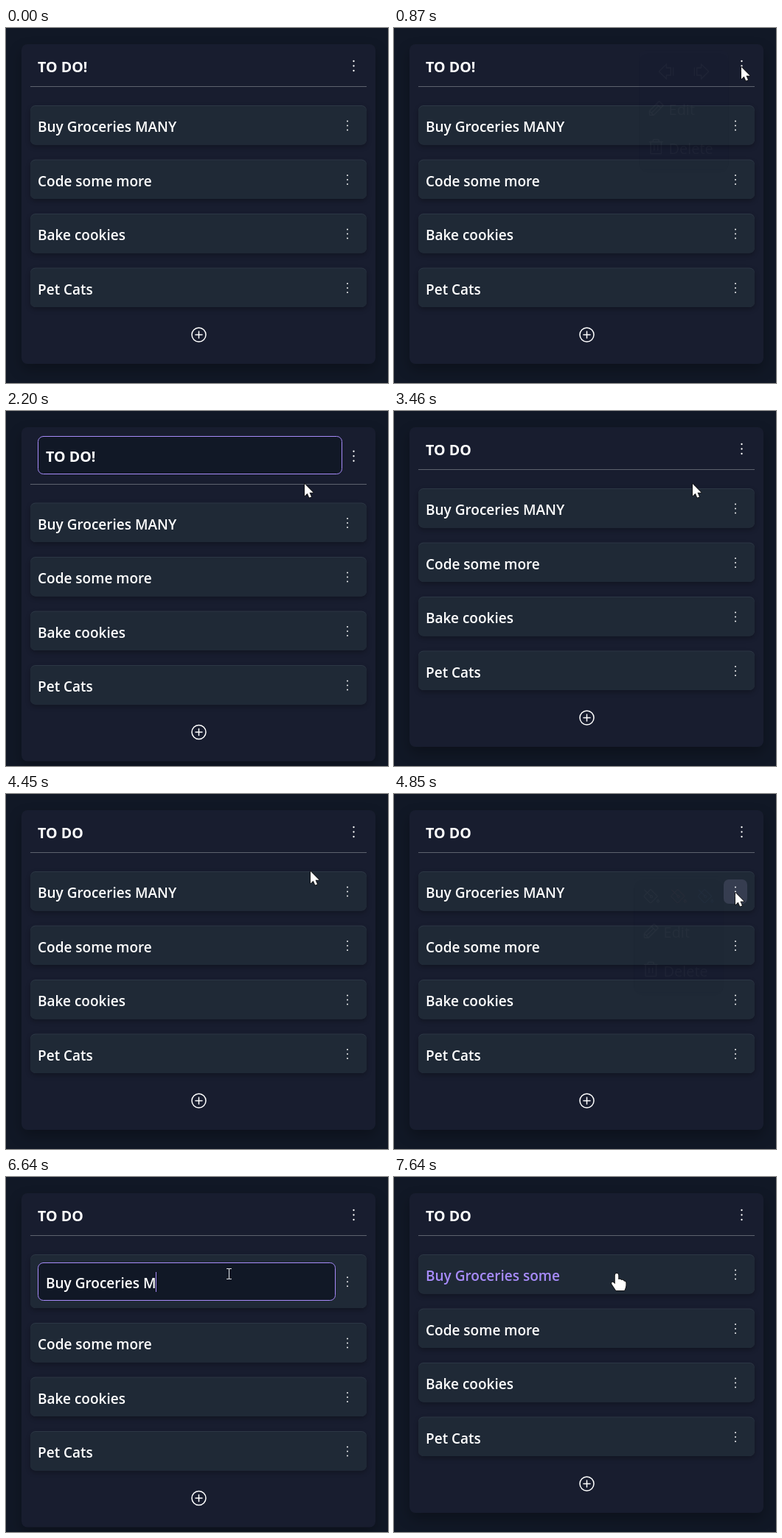
Animation, 518 px wide and 482 px high, one loop 8000 ms. Source, as an HTML page with a canvas:

```html
<!DOCTYPE html>
<html lang="en">
<head>
<meta charset="utf-8">
<title>To-do board</title>
<style>
html, body { margin: 0; width: 100%; height: 100%; overflow: hidden; background: #111826; }
canvas { display: block; }
</style>
</head>
<body>
<canvas id="stage" width="518" height="482"></canvas>
<script>
const ctx = document.getElementById('stage').getContext('2d');
const LOOP = 8000, TICK = 66.45, GROW = 19.5;
const WHITE = '#fff', PURPLE = '#a78bfa';
const FAMILY = '"Open Sans", "Noto Sans", sans-serif';
const TITLE = `700 19.6px ${FAMILY}`, ITEM = `600 19px ${FAMILY}`, MENU = `400 19px ${FAMILY}`;

const EDIT_TITLE = [25, 52], EDIT_ITEM = [87, 114];
const TITLE_MENU = [13, 25], ITEM_MENU = [73, 87];
const CLICKS = [12, 24, 72, 86];
const titleText = [[0, 'TO DO!'], [41, 'TO DO']];
const itemText = [[0, 'MANY'], [95, 'MAN'], [98, 'MA'], [100, 'M'], [103, ''],
  [106, 's'], [108, 'so'], [111, 'som'], [113, 'some']];
const path = [[7, 508, 72], [9, 486, 60], [11, 471, 53], [15, 471, 53], [19, 427, 68], [20, 419, 78],
  [22, 405, 99], [66, 405, 99], [68, 420, 110], [71, 459, 131], [72, 463, 134], [75, 463, 134],
  [80, 399, 166], [82, 387, 179], [83, 385, 181], [86, 383, 179], [87, 366, 166], [88, 322, 140],
  [89, 302, 131], [121, 302, 131]];

const icons = {
  pencil: 'M96 216H48a8 8 0 0 1-8-8V163a8 8 0 0 1 2-5L166 34a8 8 0 0 1 11 0L222 79a8 8 0 0 1 0 11L98 214ZM136 64l56 56M164 92L68 188M95 215L41 161',
  trash: 'M216 56H40M104 104v64M152 104v64M200 56V208a8 8 0 0 1-8 8H64a8 8 0 0 1-8-8V56M168 56V40a16 16 0 0 0-16-16H104a16 16 0 0 0-16 16V56',
  arrow: 'M32 128L128 32V80H184V176H128V224ZM216 80V176',
  bucket: 'M124 24L232 130L136 227a16 16 0 0 1-23 0L28 142a16 16 0 0 1 0-22ZM32 32L122 122M154 136a18 18 0 1 1-36 0a18 18 0 1 1 36 0M240 182q16 18 16 28a16 16 0 0 1-32 0q0-10 16-28Z'
};
for (const name in icons) icons[name] = new Path2D(icons[name]);
const ARROW = new Path2D('M0 0V16.2L3.7 12.8L6.2 18.6L9 17.4L6.5 11.7H11.6Z');
const HAND = new Path2D('M-2.2 2.2a2.2 2.2 0 0 1 4.4 0V8q3-1 4 1q3-.6 3.6 1.4q2.6-.2 2.6 2V16q0 3-2 7H-1L-6.6 14.6q-1-2.6 1.4-2.8l3 2.4Z');

const within = (tick, [start, end]) => tick >= start && tick < end;
const latest = (steps, tick) => steps.filter(s => s[0] <= tick).pop();

function box(x, y, w, h, r, fill, stroke) {
  ctx.beginPath();
  ctx.roundRect(x, y, w, h, r);
  if (fill) { ctx.fillStyle = fill; ctx.fill(); }
  if (stroke) { ctx.strokeStyle = stroke; ctx.lineWidth = 1; ctx.stroke(); }
}

function shadowBox(x, y, w, h, r, fill, blur, offset) {
  ctx.save();
  ctx.shadowColor = 'rgba(0,0,0,.28)';
  ctx.shadowBlur = blur;
  ctx.shadowOffsetY = offset;
  box(x, y, w, h, r, fill);
  ctx.restore();
}

function text(str, x, baseline, font, color = WHITE) {
  ctx.font = font;
  ctx.fillStyle = color;
  ctx.fillText(str, x, baseline);
}

function icon(name, cx, cy, scale, color, flip = 1) {
  ctx.save();
  ctx.translate(cx, cy);
  ctx.scale(scale * flip, scale);
  ctx.translate(-128, -128);
  ctx.strokeStyle = color;
  ctx.lineWidth = 16;
  ctx.lineCap = ctx.lineJoin = 'round';
  ctx.stroke(icons[name]);
  ctx.restore();
}

function dots(x, y, gap, r) {
  ctx.fillStyle = WHITE;
  for (const d of [-gap, 0, gap]) {
    ctx.beginPath();
    ctx.arc(x, y + d, r, 0, 7);
    ctx.fill();
  }
}

function input(y, right, str, font, caretOn) {
  box(43.5, y + .5, right - 44, 51, 7, '#111826', PURPLE);
  text(str, 54, y + 35, font);
  if (caretOn) {
    ctx.fillStyle = PURPLE;
    ctx.fillRect(Math.round(54 + ctx.measureText(str).width), y + 13, 1, 27);
  }
}

function cursorAt(tick) {
  if (tick < path[0][0]) return null;
  const i = path.findIndex(p => p[0] > tick);
  const [t0, x0, y0] = path[i - 1], [t1, x1, y1] = path[i];
  const k = (tick - t0) / (t1 - t0);
  return { x: x0 + (x1 - x0) * k, y: y0 + (y1 - y0) * k };
}

function drawMenu(x, y, rowTop, age, hover, drawTop) {
  const bottom = rowTop + 100, fade = Math.min(1, .03 + age / 3);
  const cx = x + 58, cy = (y + bottom) / 2, zoom = 1 + .05 * (1 - fade);
  ctx.save();
  ctx.globalAlpha = fade;
  ctx.translate(cx, cy);
  ctx.scale(zoom, zoom);
  ctx.translate(-cx, -cy);
  shadowBox(x, y, 116, bottom - y, 8, '#28303e', 10, 4);
  drawTop();
  [['pencil', 'Edit'], ['trash', 'Delete']].forEach(([name, label], i) => {
    const top = rowTop + 50 * i, over = hover(x + 5, top, 106, 40);
    if (over) box(x + 5, top, 106, 40, 7, '#383f50');
    const color = over ? PURPLE : WHITE;
    icon(name, x + 22, top + 20.5, .096, color);
    text(label, x + 38.5, top + 29, MENU, color);
  });
  ctx.restore();
}

function drawCursor({ x, y }, shape, clicking) {
  if (clicking) {
    ctx.fillStyle = 'rgba(235,225,0,.6)';
    ctx.beginPath();
    ctx.arc(x, y, 15, 0, 7);
    ctx.fill();
  }
  ctx.save();
  ctx.translate(Math.round(x), Math.round(y));
  if (shape === 'beam') {
    ctx.strokeStyle = '#e5e7eb';
    ctx.lineWidth = 1;
    ctx.stroke(new Path2D('M-2.5-6.5H0M1-6.5H3.5M.5-6V7M-2.5 7.5H0M1 7.5H3.5'));
  } else {
    const outline = shape === 'hand' ? HAND : ARROW;
    ctx.lineJoin = 'round';
    ctx.strokeStyle = '#111';
    ctx.lineWidth = 1.6;
    ctx.stroke(outline);
    ctx.fillStyle = WHITE;
    ctx.fill(outline);
  }
  ctx.restore();
}

function draw(tick) {
  const cursor = cursorAt(tick);
  const editTitle = within(tick, EDIT_TITLE), editItem = within(tick, EDIT_ITEM);
  const titleMenu = within(tick, TITLE_MENU), itemMenu = within(tick, ITEM_MENU);
  const over = (x, y, w, h) => cursor && cursor.x >= x && cursor.x < x + w && cursor.y >= y && cursor.y < y + h;
  const drop = editTitle ? GROW : 0, stretch = editItem ? GROW : 0;
  let shape = 'arrow';
  const hover = (...area) => {
    const hit = over(...area);
    if (hit) shape = 'hand';
    return hit;
  };

  ctx.fillStyle = '#111826';
  ctx.fillRect(0, 0, 518, 482);
  shadowBox(21, 22, 480, 434 + drop + stretch, 8, '#181d2f', 18, 8);

  const title = latest(titleText, tick)[1];
  const menuOpen = titleMenu || itemMenu;
  if (!menuOpen && !editTitle && over(456, 35, 32, 33)) box(456, 35, 32, 33, 7, '#343b4d');
  if (editTitle) input(34, 456, title, TITLE, within(tick, [25, 33]) || within(tick, [41, 49]));
  else text(title, 43, 60, TITLE);
  dots(471.5, 51.5 + drop / 2, 6.5, 1.15);
  ctx.fillStyle = '#5d626e';
  ctx.fillRect(33, Math.round(79 + drop), 456, 1);

  const groceries = 'Buy Groceries ' + latest(itemText, tick)[1];
  [groceries, 'Code some more', 'Bake cookies', 'Pet Cats'].forEach((label, i) => {
    const first = i === 0, height = 53.5 + (first ? stretch : 0);
    const y = 105 + 73.5 * i + drop + (first ? 0 : stretch);
    shadowBox(33, y, 456, height, 7, '#2c3745', 6, 3);
    box(33, y + 1, 456, height - 1, 7, '#1f2936');
    if (first && editItem) {
      input(116, 447, label, ITEM, true);
    } else {
      const lit = first && !menuOpen && !editTitle && (tick < 114 ? tick > 66 : tick > 114) && hover(33, 105, 414, 54);
      text(label, 43, y + 36, ITEM, lit ? PURPLE : WHITE);
    }
    if (first && tick > 66 && tick < 76 && over(447, 116, 32, 33)) box(447, 116, 32, 33, 7, '#363d50');
    dots(463, y + 27.5 + (first ? stretch / 2 : 0), 6, .95);
  });

  const plusY = 416.5 + drop + stretch;
  ctx.strokeStyle = WHITE;
  ctx.lineWidth = 1.5;
  ctx.lineCap = 'round';
  ctx.beginPath();
  ctx.arc(261.5, plusY, 9.5, 0, 7);
  ctx.moveTo(257, plusY);
  ctx.lineTo(266, plusY);
  ctx.moveTo(261.5, plusY - 4.5);
  ctx.lineTo(261.5, plusY + 4.5);
  ctx.stroke();

  if (titleMenu) drawMenu(335, 34, 89, tick - TITLE_MENU[0], hover, () => {
    [[370.5, 1], [415.5, -1]].forEach(([x, flip]) => {
      const lit = hover(x - 20, 41, 42, 41);
      if (lit) box(x - 20, 41, 42, 41, 7, '#383f50');
      icon('arrow', x, 61.5, .1, lit ? PURPLE : WHITE, flip);
    });
  });
  if (itemMenu) drawMenu(328, 116, 166, tick - ITEM_MENU[0], hover, () => {
    [WHITE, '#f69a98', '#7cc7f3'].forEach((color, i) => icon('bucket', 350 + 35 * i, 141, .083, color));
  });

  if (editItem && over(43, 116, 404, 52) || tick === 114) shape = 'beam';
  if (cursor) drawCursor(cursor, shape, CLICKS.includes(tick));
}

function loop() {
  draw(Math.floor((performance.now() % LOOP + 6) / TICK));
  requestAnimationFrame(loop);
}
loop();
</script>
</body>
</html>
```
